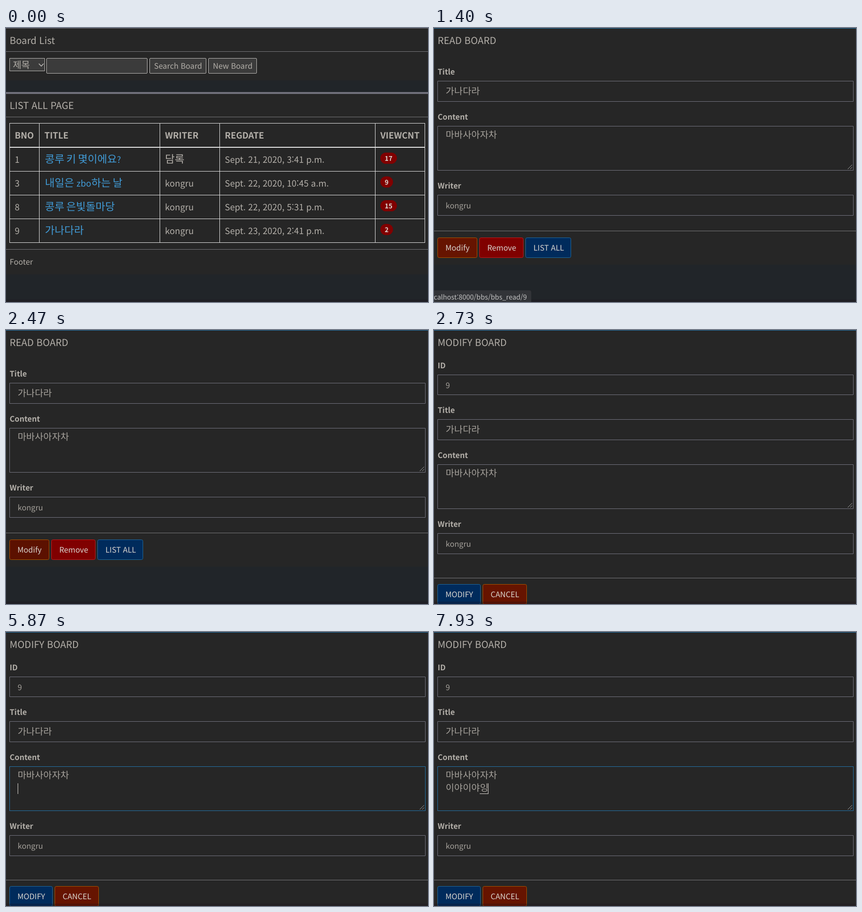
An HTML page with a canvas that plays this animation: 868x565 px, repeating every 8 s.

```html
<!DOCTYPE html>
<html lang="ko">
<head>
<meta charset="utf-8">
<title>Board</title>
<style>
html, body { margin: 0; width: 100%; height: 100%; overflow: hidden; background: #212529; }
canvas { display: block; }
</style>
</head>
<body>
<canvas id="stage" width="868" height="565"></canvas>
<script>
const ctx = document.getElementById('stage').getContext('2d');
const W = 868, H = 565, LOOP = 8000;
const FAMILY = '"Noto Sans CJK KR", "Noto Sans CJK JP", "Noto Sans CJK", sans-serif';
const INK = '#b3afa9', BRIGHT = '#dad6d0', LINK = '#419bd6', LINK_HOVER = '#3b7ca3';
const CARD = '#262626', RULE = '#77777a', EDGE = '#73737f', FOCUS = '#2373a8';
const USER = 'kongru';
const ROWS = [
  ['1', '콩루 키 몇이에요?', '담록', 'Sept. 21, 2020, 3:41 p.m.', '17'],
  ['3', '내일은 zbo하는 날', USER, 'Sept. 22, 2020, 10:45 a.m.', '9'],
  ['8', '콩루 은빛돌마당', USER, 'Sept. 22, 2020, 5:31 p.m.', '15'],
  ['9', '가나다라', USER, 'Sept. 23, 2020, 2:41 p.m.', '2']
];
const COLS = [7, 68, 316, 439, 759, 861];
// Syllables as the input method composes them, one per keystroke
const TYPED = ['이야', '이양', '이야이', '이야잉', '이야이야', '이야이양', '이야이야이', '이야이야잉'];

const clamp = v => Math.max(0, Math.min(1, v));
// Progress in thirds, one per 66.7 ms tick
const thirds = (t, start) => t < start ? 0 : Math.min(3, 1 + Math.floor((t - start + 3) / 66.7)) / 3;

function rect(x, y, w, h, color) {
  ctx.fillStyle = color;
  ctx.fillRect(x, y, w, h);
}

function box(x, y, w, h, fill, stroke, r = 0) {
  ctx.beginPath();
  ctx.roundRect(x + .5, y + .5, w - 1, h - 1, r);
  if (fill) { ctx.fillStyle = fill; ctx.fill(); }
  ctx.strokeStyle = stroke;
  ctx.lineWidth = 1;
  ctx.stroke();
}

// Hangul is set one em wide, Latin somewhat smaller
function text(str, x, y, size = 17.6, color = INK, bold = false) {
  ctx.fillStyle = color;
  for (const run of str.match(/[ㄱ-ㅎ가-힣]+|[^ㄱ-ㅎ가-힣]+/g) || []) {
    const hangul = /[ㄱ-ㅎ가-힣]/.test(run);
    const weight = bold ? 700 : hangul ? 300 : 400;
    ctx.font = `${weight} ${size * (hangul ? 1.087 : .895)}px ${FAMILY}`;
    ctx.fillText(run, x, y);
    x += ctx.measureText(run).width;
  }
  return x;
}

function button(label, x, y, w, fill, stroke, color = BRIGHT) {
  box(x, y, w, 42, fill, stroke, 3);
  text(label, x + 16.5, y + 27, 17.6, color);
}

function field(label, value, y, h = 43) {
  text(label, 7.5, y - 13, 17.6, INK, true);
  box(7, y, 856, h, null, EDGE);
  text(value, 24, y + 28, 17.6, '#a5a19b');
}

function area(label, value, y, focus = 0) {
  text(label, 7.5, y - 13, 17.6, INK, true);
  box(7, y, 856, 92, null, EDGE);
  if (focus) {
    ctx.globalAlpha = focus;
    box(7, y, 856, 92, null, FOCUS);
    ctx.globalAlpha = 1;
  }
  text(value, 24, y + 25, 17.6, '#a5a19b');
  ctx.strokeStyle = '#a0a0a0';
  ctx.beginPath();
  for (const d of [9, 4]) {
    ctx.moveTo(860 - d, y + 89);
    ctx.lineTo(860, y + 89 - d);
  }
  ctx.stroke();
}

function listPage(hover) {
  rect(0, 0, W, 108, CARD);
  rect(0, 0, W, 1, '#666670');
  text('Board List', 7.5, 33, 22);
  rect(0, 48, W, 1, RULE);
  box(7, 62, 73, 27, '#3b3b3b', '#b9b7b4');
  text('제목', 14, 83, 17.6);
  ctx.strokeStyle = '#b9b7b4';
  ctx.lineWidth = 1.6;
  ctx.beginPath();
  ctx.moveTo(67.5, 73.5);
  ctx.lineTo(72.5, 78.5);
  ctx.lineTo(77.5, 73.5);
  ctx.stroke();
  box(83, 62, 208, 32, '#3b3b3b', '#b9b7b4', 1.5);
  box(295, 62, 117, 32, '#3b3b3b', '#b9b7b4', 1.5);
  text('Search Board', 304.5, 84);
  box(416, 62, 100, 32, '#3b3b3b', '#b9b7b4', 1.5);
  text('New Board', 425.5, 84);

  rect(0, 132, W, 376, CARD);
  rect(0, 132, W, 4, '#70707b');
  text('LIST ALL PAGE', 7.5, 167, 22);
  rect(0, 183, W, 1, RULE);

  for (const x of COLS) rect(x, 196, 1, 247, '#e2e2e2');
  rect(7, 196, 855, 1, '#e2e2e2');
  rect(7, 245, 855, 2, '#e2e2e2');
  for (let i = 1; i < 5; i++) rect(7, 246 + 49 * i, 855, 1, '#e2e2e2');
  ['BNO', 'TITLE', 'WRITER', 'REGDATE', 'VIEWCNT'].forEach((name, i) =>
    text(name, COLS[i] + 11, 228, 20, INK, true));

  ROWS.forEach((row, r) => {
    const y = 278 + 49 * r;
    row.slice(0, 4).forEach((cell, c) => {
      const color = c !== 1 ? INK : hover && r === 3 ? LINK_HOVER : LINK;
      text(cell, COLS[c] + (c === 1 ? 12 : 11), y, 20, color);
    });
    ctx.fillStyle = '#800000';
    ctx.beginPath();
    ctx.roundRect(770, y - 21, row[4].length > 1 ? 34 : 26, 23, 11.5);
    ctx.fill();
    text(row[4], 779, y - 4, 15, BRIGHT, true);
  });

  rect(0, 456, W, 1, RULE);
  text('Footer', 7.5, 488);
}

function readPage(t) {
  rect(0, 0, W, 488, CARD);
  rect(0, 0, W, 1, FOCUS);
  text('READ BOARD', 7.5, 33, 22);
  field('Title', '가나다라', 109);
  area('Content', '마바사아자차', 202);
  field('Writer', USER, 344);
  rect(0, 418, W, 1, RULE);
  const overRemove = t >= 1868 && t < 1930;
  button('Modify', 7, 432, 82, t < 2400 ? '#661400' : '#5c1100', '#a85400');
  button('Remove', 93, 432, 91, overRemove ? '#740000' : '#800000', '#c01c1c');
  button('LIST ALL', 188, 432, 94, '#002b5c', '#1f699c');
}

function typedAt(t) {
  if (t < 6930) return '';
  if (t < 7067) return 'ㅇ';
  if (t < 7130) return '이';
  if (t < 7267) return '잉';
  return TYPED[Math.min(7, Math.floor((t - 7266) / 94.5))];
}

function editPage(t) {
  rect(0, 0, W, H, CARD);
  rect(0, 0, W, 1, FOCUS);
  text('MODIFY BOARD', 7.5, 33, 22);
  field('ID', '9', 92, 42);
  field('Title', '가나다라', 184);
  area('Content', '마바사아자차', 277, thirds(t, 4868));
  field('Writer', USER, 419);
  rect(0, 511, W, 1, RULE);
  button('MODIFY', 7, 524, 89, '#002b5c', '#1f699c');
  button('CANCEL', 100, 524, 91, '#661400', '#a85400');

  const typed = typedAt(t);
  if (typed) {
    const end = text(typed, 24, 328.4, 17.6, '#a5a19b');
    const start = end - 17.6;
    rect(Math.round(start), 333, Math.round(end) - Math.round(start), 1, BRIGHT);
    rect(Math.floor(end - .5), 312, 1, 22, BRIGHT);
  } else if (t >= 4868 && t < 5400) {
    rect(128, 287, 1, 22, BRIGHT);
  } else if (t >= 5867 && t < 6400) {
    rect(24, 312, 1, 22, BRIGHT);
  }
}

function statusBar(alpha) {
  if (alpha <= 0) return;
  ctx.globalAlpha = alpha;
  ctx.fillStyle = '#323438';
  ctx.beginPath();
  ctx.roundRect(-5, 541, 205, 30, 4);
  ctx.fill();
  ctx.fillStyle = '#c3c3c3';
  ctx.font = `400 14px ${FAMILY}`;
  ctx.textAlign = 'right';
  ctx.fillText('localhost:8000/bbs/bbs_read/9', 191, 560);
  ctx.textAlign = 'left';
  ctx.globalAlpha = 1;
}

function draw(t) {
  rect(0, 0, W, H, '#212529');
  if (t < 1400) listPage(t >= 668);
  else if (t < 2730) readPage(t);
  else editPage(t);
  rect(0, 560, W, 5, 'rgba(24, 14, 24, .25)');
  statusBar(clamp(thirds(t, 1000) - thirds(t, 1600)));
}

ctx.textRendering = 'geometricPrecision';
const begin = performance.now();
function tick() {
  draw((performance.now() - begin) % LOOP);
  requestAnimationFrame(tick);
}
tick();
</script>
</body>
</html>
```
